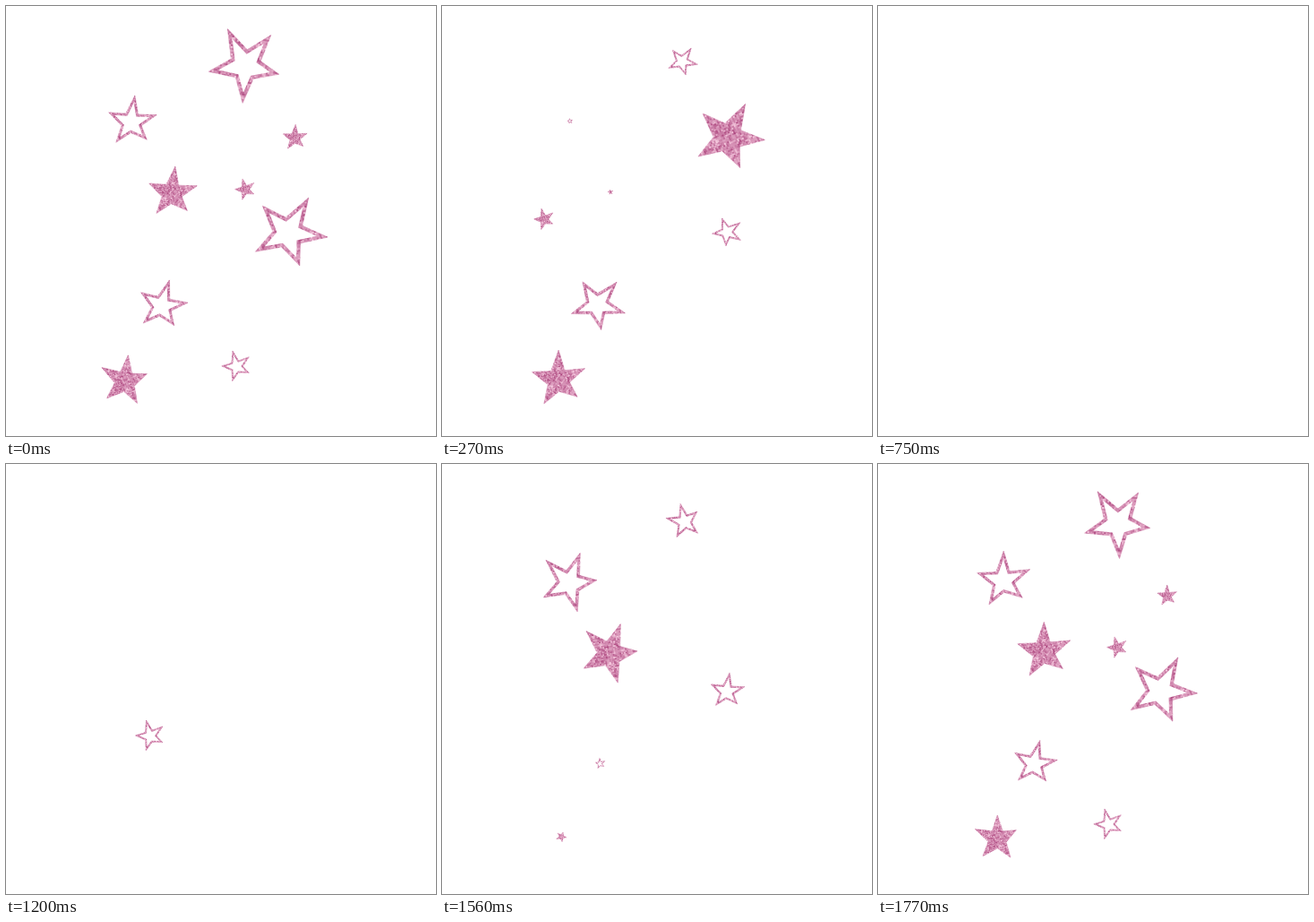
Recreate the animation shown at these times as an HTML page with a canvas. Size 480x480 px, loop 1800 ms.

```html
<!DOCTYPE html>
<html lang="en">
<head>
<meta charset="utf-8">
<title>Glitter stars</title>
<style>
html, body { margin: 0; width: 100%; height: 100%; overflow: hidden; background: #fff; }
canvas { display: block; width: 100vw; height: 100vh; }
</style>
</head>
<body>
<canvas id="stage" width="480" height="480"></canvas>
<script>
const LOOP = 1800, STEP = 30, HALF = 450;
const ctx = document.getElementById('stage').getContext('2d');
const rad = deg => deg * Math.PI / 180;

// Slightly uneven hand-drawn star: [angle, radius] of each tip
const tips = [[-149, 39.3], [-78, 37.5], [-2.8, 46.6], [66, 45.2], [138.4, 43.2]]
  .map(([a, r]) => [r * Math.cos(rad(a)), r * Math.sin(rad(a))]);

// The notches lie on a circle that sits off the middle of the tips
const NOTCH = { r: 17.5, dx: 3, dy: -0.2 };

function starPath() {
  const mid = [0, 1].map(k => tips.reduce((sum, p) => sum + p[k], 0) / 5);
  const path = new Path2D();
  tips.forEach((p, i) => {
    const q = tips[(i + 1) % 5];
    const a = Math.atan2((p[1] + q[1]) / 2 - mid[1], (p[0] + q[0]) / 2 - mid[0]);
    path.lineTo(p[0], p[1]);
    path.lineTo(mid[0] + NOTCH.dx + NOTCH.r * Math.cos(a),
                mid[1] + NOTCH.dy + NOTCH.r * Math.sin(a));
  });
  path.closePath();
  return path;
}

function glitter() {
  const size = 128, tile = document.createElement('canvas');
  tile.width = tile.height = size;
  const g = tile.getContext('2d');
  let seed = 7;
  const rnd = () => (seed = (seed * 16807) % 2147483647) / 2147483647;
  const dark = [172, 70, 126], light = [248, 206, 226];
  for (let y = 0; y < size; y += 2) {
    for (let x = 0; x < size; x += 2) {
      const k = (rnd() + rnd()) / 2;
      const rgb = dark.map((d, i) => Math.round(d + (light[i] - d) * k));
      g.fillStyle = `rgb(${rgb})`;
      g.fillRect(x, y, 2, 2);
    }
  }
  return ctx.createPattern(tile, 'repeat');
}

const star = starPath(), paint = glitter();

// Growing and shrinking stars
const FAST = { from: 0, turn: 200 }, SLOW = { from: 116, turn: 80 };
const spinners = [
  { x: 143, y: 128.7, start: 1200, spin: FAST, hollow: true },
  { x: 188.1, y: 207.9, start: 1200, spin: FAST },
  { x: 270, y: 62.2, start: 1350, spin: FAST, hollow: true },
  { x: 320, y: 253.3, start: 1350, spin: SLOW, hollow: true },
  { x: 177, y: 334.1, start: 1500, spin: SLOW, hollow: true },
  { x: 132.9, y: 415.7, start: 1500, spin: FAST },
  { x: 323.8, y: 146.7, start: 1650, spin: SLOW }
];

// Small stars that blink in place
const BLINK = 90;
const blinks = [
  { x: 162.4, y: 302.4, start: 1200, hollow: true },
  { x: 172, y: 320.4, start: 1380 },
  { x: 258.8, y: 401.2, start: 1740, hollow: true },
  { x: 268, y: 204.1, start: 1740 },
  { x: 115, y: 237.4, start: 210 }
];

function drawStar(s, scale, deg) {
  ctx.save();
  ctx.translate(s.x, s.y);
  ctx.rotate(rad(deg));
  ctx.scale(scale, scale);
  ctx.fillStyle = ctx.strokeStyle = paint;
  // thin rim keeps the tips crisp at every size
  ctx.lineWidth = 0.6 / scale;
  ctx.stroke(star);
  if (s.hollow) {
    ctx.clip(star);
    ctx.lineWidth = 8;
    ctx.stroke(star);
  } else {
    ctx.fill(star);
  }
  ctx.restore();
}

function render(t) {
  ctx.fillStyle = '#fff';
  ctx.fillRect(0, 0, 480, 480);
  const age = s => (t - s.start + LOOP) % LOOP;
  for (const s of spinners) {
    const a = age(s);
    if (a > 0 && a < 2 * HALF) {
      const scale = 1 - Math.abs(a - HALF) / HALF;
      drawStar(s, scale, s.spin.from + s.spin.turn * a / (2 * HALF));
    }
  }
  for (const s of blinks) {
    if (age(s) < BLINK) drawStar(s, s.hollow ? 0.4 : 0.275, 112);
  }
}

let origin = null;
function tick(now) {
  if (origin === null) origin = now;
  const t = Math.max(0, now - origin) % LOOP;
  render(Math.floor(t / STEP) * STEP);
  requestAnimationFrame(tick);
}
render(0);
requestAnimationFrame(tick);
</script>
</body>
</html>
```
